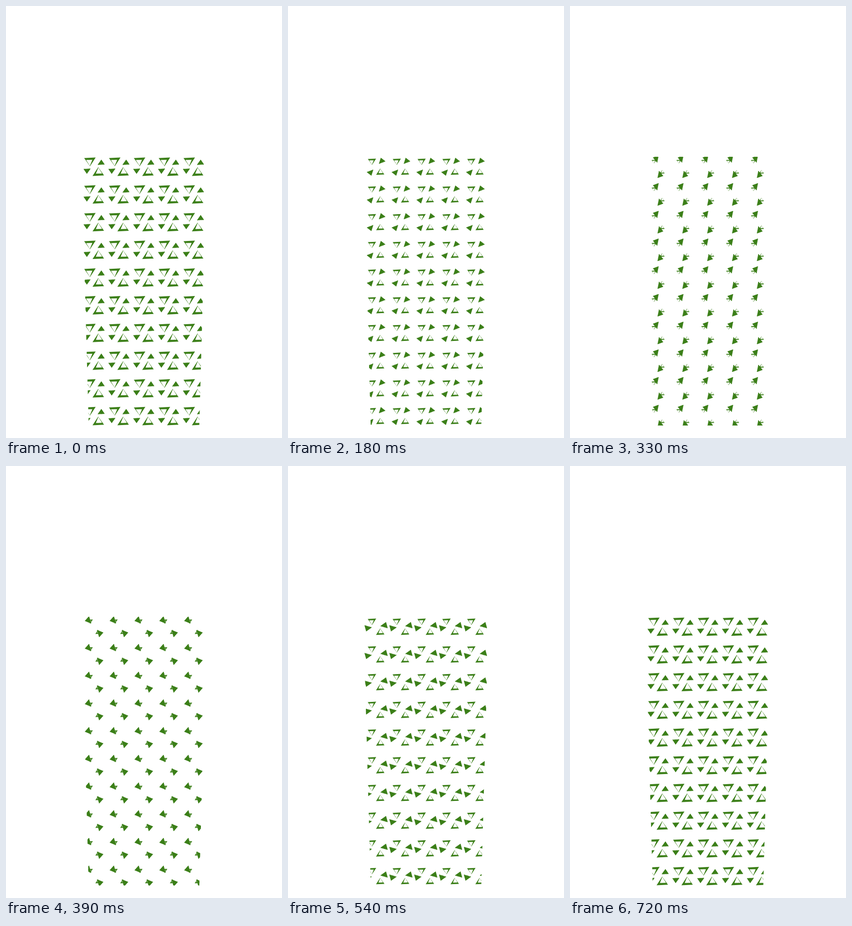
Recreate the animation shown at these times as an HTML page with a canvas. Size 599x934 px, loop 0.75 s.

```html
<!DOCTYPE html>
<html lang="en">
<head>
<meta charset="utf-8">
<title>Triangle pattern</title>
<style>
  html, body { margin: 0; width: 100%; height: 100%; overflow: hidden; background: #fff; }
  canvas { display: block; width: 599px; height: 934px; }
</style>
</head>
<body>
<canvas id="stage" width="599" height="934"></canvas>
<script>
const ctx = document.getElementById('stage').getContext('2d');
const LOOP = 750, STEP = 30;
const COLS = 5, ROWS = 10, PITCH_X = 53.9, PITCH_Y = 59.9;
const ORIGIN = { x: 191.2, y: 347.5 };

// Key times with the turn (degrees) and size of the solids, and the size of the hollow triangles.
const TIMES  = [0, 120, 240, 330, 480, 600, 720, 750];
const TURN   = [0, 7, 34, 75, 143, 172, 179.3, 180];
const SOLID  = [1, 1, 1, 1.04, 1.12, 1.03, 1, 1];
const HOLLOW = [1, 0.84, 0.58, 0.43, 0.65, 0.82, 0.99, 1];

// Smooth curve through the keys, at rest at both ends of the loop.
function curve(values, t) {
  const last = TIMES.length - 1;
  const slope = k => k === 0 || k === last ? 0
    : (values[k + 1] - values[k - 1]) / (TIMES[k + 1] - TIMES[k - 1]);
  let i = 0;
  while (i < last - 1 && t >= TIMES[i + 1]) i++;
  const h = TIMES[i + 1] - TIMES[i], u = (t - TIMES[i]) / h, v = 1 - u;
  return values[i] * v * v * (1 + 2 * u) + values[i + 1] * u * u * (3 - 2 * u)
    + h * u * v * (slope(i) * v - slope(i + 1) * u);
}

// Points of a toothed edge from a to b.
function teeth(a, b, count, depth) {
  const dx = b[0] - a[0], dy = b[1] - a[1], len = Math.hypot(dx, dy);
  return Array.from({ length: count * 2 + 1 }, (_, i) => {
    const k = i / (count * 2), d = i % 2 ? depth : 0;
    return [a[0] + dx * k - dy / len * d, a[1] + dy * k + dx / len * d];
  });
}

function shape(...rings) {
  const path = new Path2D();
  for (const ring of rings) {
    ring.forEach(([x, y], i) => i ? path.lineTo(x, y) : path.moveTo(x, y));
    path.closePath();
  }
  return path;
}

// The solid is placed around the cell centre, the hollow one around its own anchor.
const solid = shape([...teeth([7.8, -4.4], [22.8, -5.3], 5, 0.9), [15.7, -15.5]]);
const ANCHOR = { x: -8.6, y: -11.5 };
const hollow = shape(
  [[-13, -7.2], [12, -8.4], [-0.3, 10.4]],
  [...teeth([-9, -3.6], [5, -3.9], 5, 0.9), [-0.6, 9.6]]
);

const clip = shape([[163.5, 326], [435.5, 326], [419.5, 907], [179.5, 907]]);

function drawPair(turn, solidSize, hollowSize) {
  for (let half = 0; half < 2; half++) {
    ctx.save();
    ctx.rotate(half * Math.PI);

    ctx.save();
    ctx.rotate(-turn);
    ctx.scale(solidSize, solidSize);
    ctx.fill(solid);
    ctx.restore();

    ctx.translate(ANCHOR.x, ANCHOR.y);
    ctx.scale(hollowSize, hollowSize);
    ctx.fill(hollow, 'evenodd');
    ctx.restore();
  }
}

function draw(t) {
  const turn = curve(TURN, t) * Math.PI / 180;
  const solidSize = curve(SOLID, t), hollowSize = curve(HOLLOW, t);
  ctx.clearRect(0, 0, 599, 934);
  ctx.save();
  ctx.clip(clip);
  ctx.fillStyle = '#3b7f18';
  for (let row = 0; row < ROWS; row++) {
    for (let col = 0; col < COLS; col++) {
      ctx.save();
      ctx.translate(ORIGIN.x + col * PITCH_X, ORIGIN.y + row * PITCH_Y);
      drawPair(turn, solidSize, hollowSize);
      ctx.restore();
    }
  }
  ctx.restore();
}

const start = performance.now();
function tick() {
  const t = (performance.now() - start) % LOOP;
  draw(Math.floor(t / STEP) * STEP);
  requestAnimationFrame(tick);
}
tick();
</script>
</body>
</html>
```
